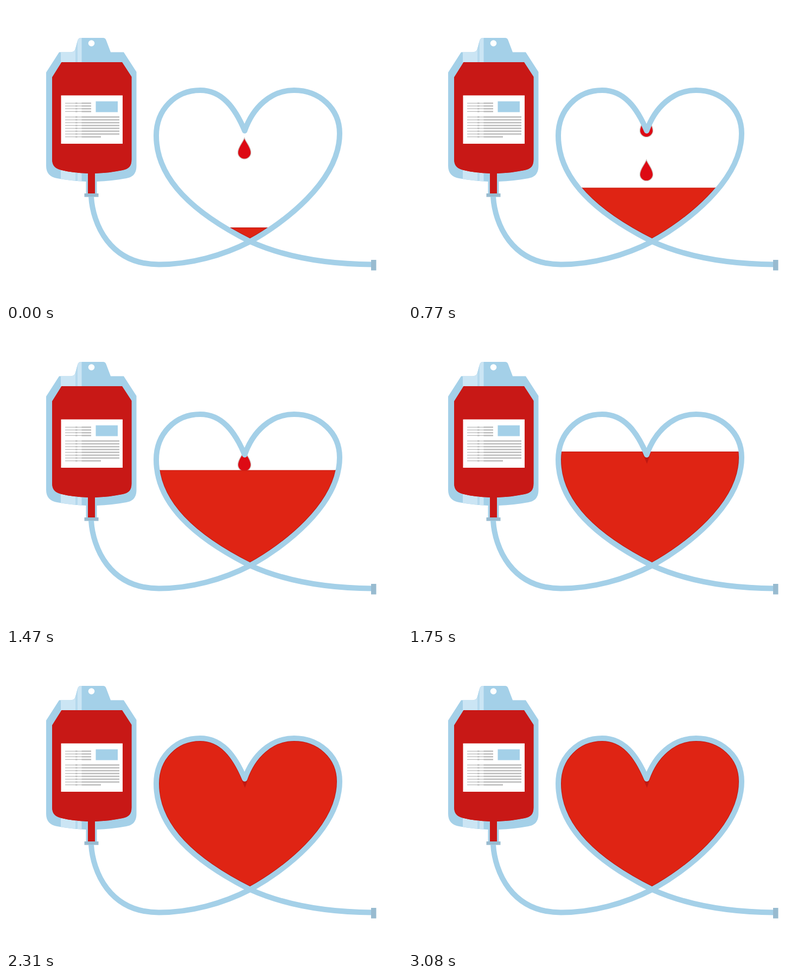
An HTML page that plays this animation: 730 by 548 pixels, repeating every 3.15 s.

```html
<!DOCTYPE html>
<html lang="en">
<head>
<meta charset="utf-8">
<title>Blood donation</title>
<style>
  html, body { margin: 0; width: 100%; height: 100%; overflow: hidden; background: #fff; }
  svg { display: block; width: 730px; height: 548px; }
</style>
</head>
<body>
<svg viewBox="0 0 730 548">
  <defs>
    <clipPath id="heartClip"><path id="heart"/></clipPath>
    <clipPath id="bagClip"><use href="#bag"/></clipPath>
    <clipPath id="bloodClip"><use href="#blood"/></clipPath>
    <clipPath id="levelClip"><rect id="level" x="260" width="370" height="400"/></clipPath>
  </defs>

  <path id="bag" fill="#a4d0e8" d="M98 85.5H119Q126 85.5 128 79L132 64Q133.500 59 138 59H179Q183 59 184.500 63L193 85.500H217L240.500 122V296C240.500 311 233 317 222 319C204 322 186 324.500 167.500 325V348H147.500V325C129 324.500 112 322 94 319C82 317 74 310 74 296V123Z"/>
  <g clip-path="url(#bagClip)" fill="#cbe5f4">
    <path d="M101 50H128V330H101ZM131.500 50H139.500V330H131.500Z"/>
    <path d="M128 50H131.500V330H128Z" fill="#b5d9ed"/>
  </g>
  <path id="blood" fill="#c81816" d="M102.500 104H214L231.500 131V284C231.500 297 226 301.500 215 304C198 307.500 181 309.500 164 310V348H151V310C134 309.500 118 307.500 101 303.500C90 300.500 85 295 85 284V132Z"/>
  <g clip-path="url(#bloodClip)">
    <path fill="#d92414" d="M101 100H128V312H101ZM131.500 100H139.500V312H131.500Z"/>
    <use href="#blood" style="fill:none" stroke="#b01212" stroke-width="0"/>
  </g>
  <circle cx="157.500" cy="69" r="5.800" fill="#fff"/>
  <rect x="144.500" y="347" width="26" height="6.500" fill="#98bbd0"/>

  <rect x="101.500" y="165.500" width="113.500" height="89.500" fill="#fff"/>
  <rect x="165.500" y="176.500" width="40.500" height="20" fill="#a4d0e8"/>
  <g id="lines" fill="#bebebe"></g>

  <g clip-path="url(#heartClip)">
    <g id="drops" fill="#dd0a14" stroke="#cbbfbb" stroke-width="1.200"></g>
    <g clip-path="url(#levelClip)">
      <use href="#heart" fill="#df2414" stroke="#c01812" stroke-width="12"/>
      <rect id="surface" x="260" width="370" height="1" fill="#c01812"/>
    </g>
  </g>
  <path id="tube" fill="none" stroke="#a4d0e8" stroke-width="10" stroke-linejoin="round"/>
  <rect x="673" y="470" width="9.500" height="19.500" fill="#98bbd0"/>
</svg>
<script>
  const FRAME = 70, COUNT = 45, CYCLE = 8;
  const LEVELS = [[0, 410], [7, 362], [11, 336.5], [17, 294], [25, 225], [33, 153], [45, 150]];
  const $ = id => document.getElementById(id);

  function add(parent, tag, attrs) {
    const el = document.createElementNS('http://www.w3.org/2000/svg', tag);
    for (const k in attrs) el.setAttribute(k, attrs[k]);
    return parent.appendChild(el);
  }

  const outline = '450 436C510 403 615 325 615 236C615 190 578 156 531 156' +
    'C488 156 455 188 440 231C422 188 398 156 358 156' +
    'C312 156 277 192 277 240C277 321 347 384 450 436';
  $('heart').setAttribute('d', 'M' + outline + 'Z');
  $('tube').setAttribute('d', 'M157 353C160 402 190 478.5 282 478.5C340 478.5 400 462 ' +
    outline + 'C512 464 590 478 675 478.5');

  // Label text: thin under the glossy strips, bold elsewhere
  function textLine(y, end) {
    const bar = (x, w, h) => add($('lines'), 'rect', { x, y: y - h / 2, width: w, height: h });
    bar(109, 31, 1.4);
    bar(128, 3.5, 2.6);
    bar(139.5, end - 139.5, 2.6);
  }
  for (let i = 0; i < 4; i++) textLine(180 + i * 5.1, 157);
  for (let i = 0; i < 8; i++) textLine(205.5 + i * 5.25, i < 7 ? 209 : 175);

  const drops = [0, 1].map(() => add($('drops'), 'path', {
    d: 'M0 .5C3 9 12 17.500 12 27.500A12 12 0 0 1 -12 27.500C-12 17.500 -3 9 0 .5Z'
  }));

  function levelAt(f) {
    const i = LEVELS.findIndex(p => p[0] > f);
    const [f0, y0] = LEVELS[i - 1], [f1, y1] = LEVELS[i];
    return y0 + (y1 - y0) * (f - f0) / (f1 - f0);
  }

  // Each drop is squeezed out steadily, then falls from rest
  const dropY = age => age < 0 ? 241 + 9.5 * age : 241 + 2.7 * age * age;

  function draw(now) {
    const f = Math.floor(now / FRAME) % COUNT;
    const y = levelAt(f);
    $('level').setAttribute('y', y);
    $('surface').setAttribute('y', y);
    const age = (f + 1) % CYCLE;
    drops.forEach((d, i) => {
      const a = age - i * CYCLE;
      d.setAttribute('transform', `translate(439.5 ${dropY(a)})`);
      d.setAttribute('visibility', a < -6 ? 'hidden' : 'visible');
    });
  }

  const start = performance.now();
  function tick() {
    draw(performance.now() - start);
    requestAnimationFrame(tick);
  }
  tick();
</script>
</body>
</html>
```
